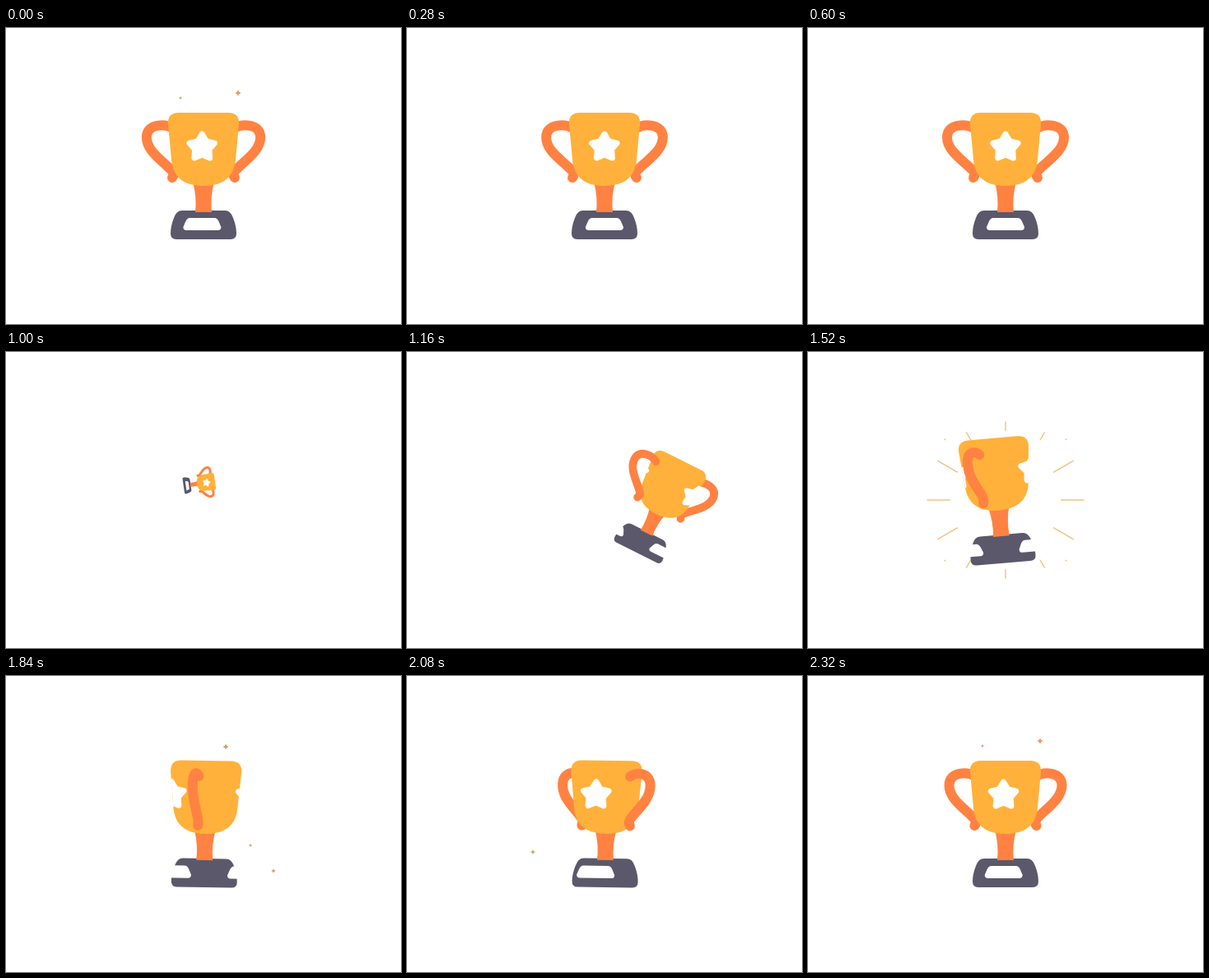
Recreate the animation shown at these times as an HTML page with a canvas. Size 480 by 360 pixels, loop 2.36 s.

```html
<!DOCTYPE html>
<html lang="en">
<head>
<meta charset="utf-8">
<title>Trophy</title>
<style>
  html, body { margin: 0; width: 100%; height: 100%; overflow: hidden; background: #fff; }
  canvas { display: block; }
</style>
</head>
<body>
<canvas id="stage" width="480" height="360"></canvas>
<script>
const ctx = document.getElementById('stage').getContext('2d');
const LOOP = 2360, SPIN_START = 1000, SPIN_TIME = 1920;
const GOLD = '#ffb13b', ORANGE = '#ff8243', SLATE = '#5b586b', WHITE = '#fff';

// Shapes are drawn around the trophy's centre.
const cup = new Path2D('M-30-77H30Q44-77 43-63L39-20C37 3 22 12 0 12C-22 12-37 3-39-20L-43-63Q-44-77-30-77Z');
const stem = new Path2D('M-13 7H13Q8 26 10 44H-10Q-8 26-13 7Z');
const base = new Path2D('M-26 42H26Q33 42 36 51Q40 61 40 70Q40 77 33 77H-33Q-40 77-40 70Q-40 61-36 51Q-33 42-26 42Z');
const slot = new Path2D('M-15 51H15Q18 51 20 55L23 62Q23 66 19 66H-19Q-23 66-23 62L-20 55Q-18 51-15 51Z');
const glint = new Path2D('M0-1Q.2-.2 1 0Q.2.2 0 1Q-.2.2-1 0Q-.2-.2 0-1Z');
const star = new Path2D();
for (let i = 0; i < 10; i++) {
  const r = i % 2 ? 9 : 16, a = i * Math.PI / 5;
  star.lineTo(r * Math.sin(a), -35 - r * Math.cos(a));
}
star.closePath();

// time, x, y, rotation, scale
const flight = [
  [600, 240, 180, 0, 1],
  [800, 240, 176, 32, .66],
  [920, 237, 167, 68, .34],
  [1000, 234.5, 160, 81.5, .25],
  [1060, 282, 152, 66, .45],
  [1120, 318, 172, 42, .68],
  [1180, 296, 194, 20, .86],
  [1240, 246, 199, 2, .95],
  [1320, 203, 188, -10.5, .99],
  [1400, 208, 183, -9, .99],
  [1520, 231, 180.8, -5, .99],
  [1840, 242, 180, 1, 1],
  [2320, 240, 180, 0, 1]
];
// time, how far the handles trail the star, in half turns
const trail = [[1000, 0], [1320, .6], [1520, .14], [1840, .14], [2320, .06], [2920, 0]];
// x, y, radius, start, life, colour
const glints = [
  [267, 86, 3.6, 1720, 300, '#c9a06e'],
  [297, 206, 2, 1740, 260, '#d3a566'],
  [325, 237, 2.8, 1760, 280, '#cda877'],
  [153, 214, 3, 1900, 280, '#d9a468'],
  [212, 85, 2, 2200, 300, '#f0935c'],
  [282, 79, 3.8, 2250, 300, '#f0935c']
];

const clamp = v => Math.max(0, Math.min(1, v));
const easeOut = v => 1 - (1 - clamp(v)) ** 2;

// Smooth curve through the keys, flat at both ends.
function track(keys, t, col) {
  const last = keys.length - 1;
  if (t <= keys[0][0]) return keys[0][col];
  if (t >= keys[last][0]) return keys[last][col];
  let i = 0;
  while (t > keys[i + 1][0]) i++;
  const slope = k => k === 0 || k === last ? 0
    : (keys[k + 1][col] - keys[k - 1][col]) / (keys[k + 1][0] - keys[k - 1][0]);
  const a = keys[i], b = keys[i + 1], d = b[0] - a[0], u = (t - a[0]) / d;
  const h = u * u * (3 - 2 * u);
  return a[col] * (1 - h) + b[col] * h
    + d * u * (1 - u) * ((1 - u) * slope(i) - u * slope(i + 1));
}

function fill(path, color) {
  ctx.fillStyle = color;
  ctx.fill(path);
}

function handle(k) {
  ctx.beginPath();
  ctx.moveTo(38 * k, -58);
  ctx.bezierCurveTo(48 * k, -64, 71 * k, -64, 71 * k, -47);
  ctx.bezierCurveTo(71 * k, -31, 53 * k, -20, 42 * k, -9);
  ctx.quadraticCurveTo(35 * k, -3, 39 * k, 2);
  ctx.strokeStyle = ORANGE;
  ctx.lineWidth = 12;
  ctx.stroke();
}

// Marks that slide sideways and repeat every half turn.
function slide(turn, gap, draw) {
  const x = (turn - Math.round(turn)) * gap;
  for (const dx of [x - gap, x, x + gap]) {
    ctx.save();
    ctx.translate(dx, 0);
    draw();
    ctx.restore();
  }
}

function drawStar() {
  ctx.strokeStyle = WHITE;
  ctx.lineWidth = 7;
  ctx.stroke(star);
  fill(star, WHITE);
}

function trophy(t) {
  const u = clamp((t - SPIN_START) / SPIN_TIME);
  const turn = -7 * (1 - u) ** 4.83;
  const angle = (turn - track(trail, t, 1) + .5) * Math.PI;
  const k = Math.sin(angle), depth = Math.cos(angle);
  const [x, y, rot, scale] = [1, 2, 3, 4].map(c => track(flight, t, c));

  ctx.save();
  ctx.translate(x, y);
  ctx.rotate(rot * Math.PI / 180);
  ctx.scale(scale, scale);
  ctx.lineCap = ctx.lineJoin = 'round';
  fill(base, SLATE);
  slide(turn, 90, () => fill(slot, WHITE));
  if (depth < .3) handle(k);
  if (depth > -.3) handle(-k);
  fill(stem, ORANGE);
  fill(cup, GOLD);
  ctx.save();
  ctx.clip(cup);
  slide(turn, 97, drawStar);
  ctx.restore();
  if (depth >= .3) handle(k);
  if (depth <= -.3) handle(-k);
  ctx.restore();
}

function ray(deg, from, to) {
  if (to - from < .3) return;
  const a = deg * Math.PI / 180, c = Math.cos(a), s = Math.sin(a);
  ctx.beginPath();
  ctx.moveTo(240 + from * c, 180 + from * s);
  ctx.lineTo(240 + to * c, 180 + to * s);
  ctx.stroke();
}

function rays(t) {
  ctx.lineCap = 'butt';
  ctx.lineWidth = 1.4;
  for (let deg = 0; deg < 360; deg += 30) {
    if (t > 1220 && t < 1540) {
      const diagonal = deg % 90 === 30;
      const travel = diagonal ? 38 : 35;
      ctx.strokeStyle = '#f3bb62';
      ray(deg + 15, 67 + travel * clamp((t - 1320) / (diagonal ? 210 : 190)),
        67 + travel * easeOut((t - 1220) / 270));
    }
    if (t > 1400 && t < 1730) {
      const steep = Math.abs(Math.sin(deg * Math.PI / 180)) > .6;
      const from = steep ? 67 + 32 * clamp((t - 1430) / 170) : 67 + 32 * clamp((t - 1520) / 200);
      ctx.strokeStyle = '#f0c080';
      ray(deg, from, 67 + 32 * easeOut((t - 1400) / 180));
    }
  }
}

function sparkle(t, [x, y, r, start, life, color]) {
  const u = (t - start) / life;
  if (u <= 0 || u >= 1) return;
  const size = r * Math.min(1, 1.4 * Math.sin(u * Math.PI));
  ctx.save();
  ctx.translate(x, y);
  ctx.scale(size, size);
  fill(glint, color);
  ctx.restore();
}

function frame() {
  const now = performance.now() % LOOP;
  const t = now < 600 ? now + LOOP : now;
  ctx.fillStyle = WHITE;
  ctx.fillRect(0, 0, 480, 360);
  rays(t);
  trophy(t);
  glints.forEach(g => sparkle(t, g));
  requestAnimationFrame(frame);
}
frame();
</script>
</body>
</html>
```
